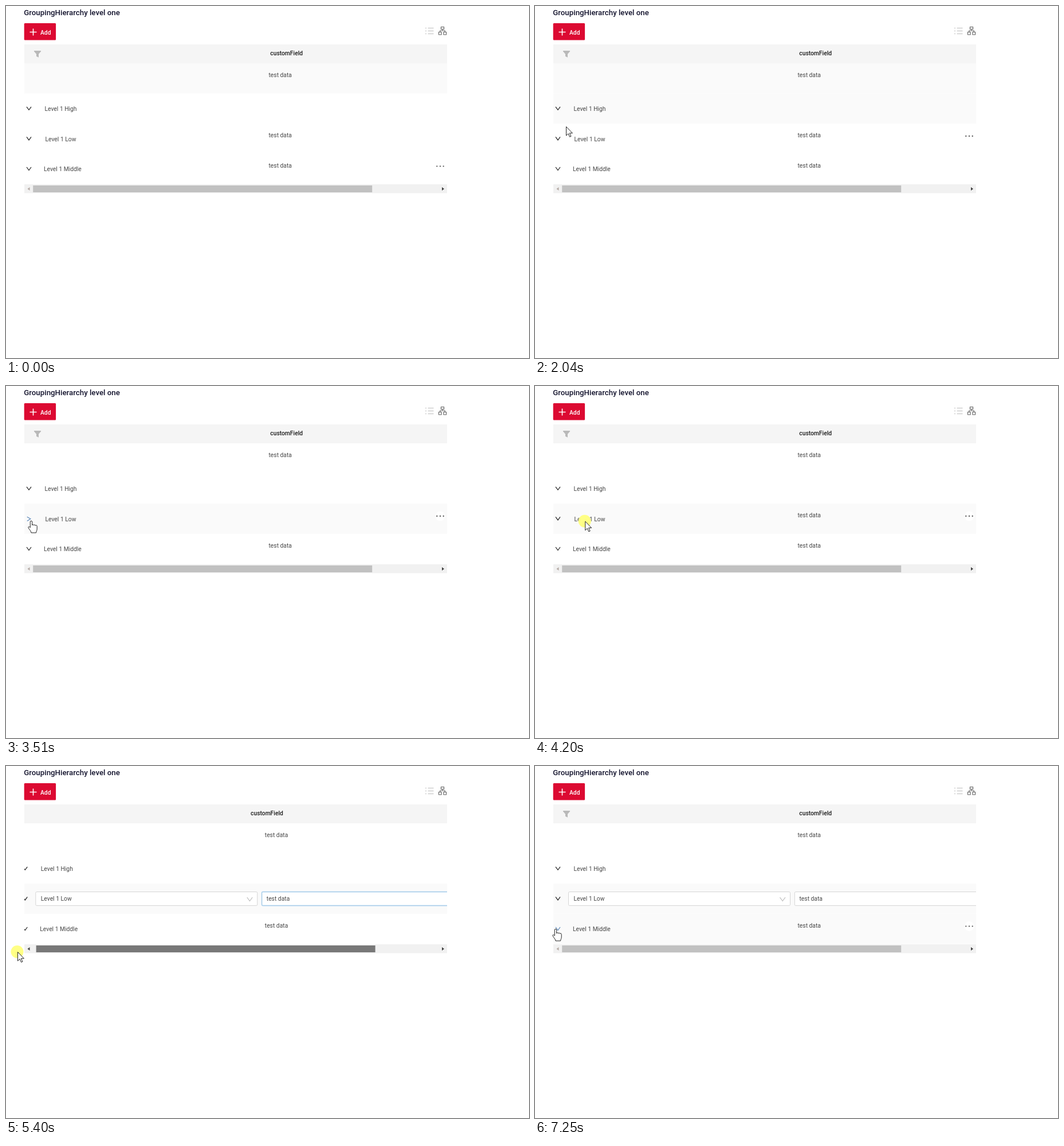
Recreate the animation shown at these times as an HTML page. Size 913 px wide and 614 px high, loop 8 s.

```html
<!DOCTYPE html>
<html lang="en">
<head>
<meta charset="utf-8">
<title>Grouping table</title>
<style>
  html, body { margin: 0; width: 100%; height: 100%; overflow: hidden; background: #fff; }
  svg { display: block; width: 100vw; height: 100vh; }
  text { font: 10.3px Roboto, sans-serif; fill: #474747; white-space: pre; }
  .title { font-size: 13.3px; font-weight: 500; fill: #14142e; }
  .head { font-weight: 500; fill: #1c1c1c; }
  .add { font-weight: 500; fill: #fff; }
  .line { fill: none; stroke-width: 1.2; }
</style>
</head>
<body>
<svg viewBox="0 0 913 614">
  <defs><clipPath id="table"><rect x="32" y="60" width="738" height="270"/></clipPath></defs>
  <text class="title" x="31.3" y="15.5">GroupingHierarchy level one</text>
  <rect x="31.7" y="30" width="55.4" height="29.4" rx="1.5" fill="#dc0a32"/>
  <path d="M41.5 45.5h12M47.5 39.5v12" stroke="#fff" stroke-width="1.6"/>
  <text class="add" x="60" y="49.5">Add</text>
  <path d="M736.5 38.5h10M736.5 43.5h10M736.5 48.5h10M732 38.5h2M732 43.5h2M732 48.5h2" stroke="#bdbdbd"/>
  <path class="line" d="M759.5 36.5h5v4h-5zM755.5 45.5h4.5v4.5h-4.5zM764 45.5h4.5v4.5h-4.5zM762 40.5v2.5M757.7 45.5v-2.5h8.6v2.5" stroke="#666"/>
  <g id="scene"></g>
</svg>
<script>
const LOOP = 8000;
const ENTER = 30;
const EDIT = 4480;
const DRAG = { start: 5150, end: 5420, release: 5650 };
const MAX_SCROLL = 95.3;
const CLICK = 200;
const ROW_HEIGHT = 52.6;

const MOVES = [
  { start: ENTER, end: 740, x: 34, y: 190 },
  { start: 860, end: 1100, x: 39, y: 181 },
  { start: 1880, end: 2040, x: 54, y: 210 },
  { start: 2340, end: 3440, x: 44, y: 235 },
  { start: 4080, end: 4280, x: 110, y: 236 },
  { start: EDIT, end: 4790, x: 147, y: 363 },
  { start: 4880, end: DRAG.start, x: 150, y: 319 },
  { start: DRAG.start, end: 5400, x: 20, y: 324 },
  { start: DRAG.release, end: 6270, x: 36, y: 284 }
];

// hover: time span of the row highlight; toggles: collapse and expand times
const ROWS = [
  { hover: [-LOOP, 2340], toggles: [] },
  { hover: [430, 2340], toggles: [1330, 1880], label: 'Level 1 High', x: 67.5 },
  { hover: [2340, LOOP], toggles: [3510, 4080], label: 'Level 1 Low', x: 68.5, editable: true },
  { hover: [6100, LOOP], toggles: [6700, 7250], label: 'Level 1 Middle', x: 66 }
].map((row, i) => ({ ...row, top: 100 + i * ROW_HEIGHT, hasData: i !== 1 }));

const DOUBLE_CLICK = [EDIT - CLICK / 2, EDIT];
const CLICKS = [...ROWS.flatMap(row => row.toggles), ...DOUBLE_CLICK];

const within = (t, [start, end]) => t >= start && t < end;
const ramp = (t, start, end) => Math.min(1, Math.max(0, (t - start) / (end - start)));
const ease = p => p * p * (3 - 2 * p);

function pointerAt(t) {
  let x = 865, y = 450;
  for (const move of MOVES) {
    const p = ease(ramp(t, move.start, move.end));
    x += (move.x - x) * p;
    y += (move.y - y) * p;
  }
  return { x, y };
}

const scrollAt = t => t < EDIT ? 0 : MAX_SCROLL * (1 - ramp(t, DRAG.start, DRAG.end));
const isDragging = t => within(t, [DRAG.start, DRAG.release]);
const isPressed = t => isDragging(t) || CLICKS.some(end => within(t, [end - CLICK, end]));
const chevronY = row => row.top + 26.5;
const onChevron = (row, { x, y }) => row.label && x < 50 && Math.abs(y - chevronY(row)) < 7;

const rect = (x, y, w, h, fill, extra = '') =>
  `<rect x="${x}" y="${y}" width="${w}" height="${h}" fill="${fill}" ${extra}/>`;
const text = (x, y, value, extra = '') => `<text x="${x}" y="${y}" ${extra}>${value}</text>`;
const path = (d, extra) => `<path d="${d}" ${extra}/>`;
const shift = (dx, content) => `<g transform="translate(${-dx} 0)">${content}</g>`;

function header(scroll) {
  return rect(32, 67, 738, 33, '#f5f5f5') + shift(scroll,
    path('M49 78h12v1.2l-4 4.6v6l-4-2v-4l-4-4.6z', 'fill="#b9b9b9"') +
    text(461.3, 85.5, 'customField', 'class="head"'));
}

function editors(t, y) {
  const focus = t < DRAG.start ? 1 : 1 - ramp(t, DRAG.start, DRAG.start + 400);
  const field = (x, w, fill, stroke) => rect(x, y - 12, w, 24, fill, `rx="2" ${stroke}`);
  const plain = 'stroke="#d5d5d5"';
  const focused = `stroke="#5cb3f7" stroke-width="1.8" stroke-opacity="${focus}"`;
  return field(58.5, 387, '#fff', plain) + text(67.5, y + 3.7, 'Level 1 Low') +
    path(`M427.5 ${y - 2.3}l4.7 6.3 4.7-6.3`, 'class="line" stroke="#bfbfbf"') +
    field(453.3, 411, '#fff', plain) + field(453.3, 411, 'none', focused) +
    text(461.5, y + 3.7, 'test data');
}

function rowContent(row, t, pointer) {
  const data = row.hasData ? text(458.5, row.top + 24, 'test data') : '';
  if (!row.label) return data;
  const y = chevronY(row);
  const closed = within(t, row.toggles);
  const arrow = closed ? `M36.8 ${y - 3.5}l6 3.6-6 3.6` : `M36 ${y - 3.3}l4 5.5 4-5.5`;
  const color = onChevron(row, pointer) ? '#5a86b8' : '#222';
  const chevron = path(arrow, `class="line" stroke="${color}"`);
  if (row.editable && t >= EDIT) return chevron + editors(t, Math.floor(y) + .5);
  return chevron + text(row.x, y + 3.8, row.label) + (closed ? '' : data);
}

function rowMenu(row, t, { x, y }) {
  const hovered = t < ENTER
    ? row === ROWS[3]
    : within(x, [32, 770]) && within(y, [row.top, row.top + ROW_HEIGHT]);
  const editing = row.editable && t >= EDIT;
  if (!hovered || !row.hasData || editing) return '';
  const cy = row.top + 21.7;
  return `<circle cx="758" cy="${cy}" r="8.5" fill="#fff"/>` +
    [-5.7, 0, 5.7].map(dx => `<circle cx="${758 + dx}" cy="${cy}" r="1.1" fill="#444"/>`).join('');
}

function scrollbar(scroll, dragging) {
  return rect(32, 311, 738, 15.5, '#f1f1f1') +
    rect(47.2 + scroll * .81, 313, 592, 12, dragging ? '#787878' : '#c1c1c1') +
    path('M41.5 316v6l-4-3z', `fill="${scroll > 0 ? '#444' : '#b5aaa5'}"`) +
    path('M761 316v6l4-3z', 'fill="#444"');
}

function cursor(t, pointer) {
  if (t < ENTER) return '';
  const shape = ROWS.some(row => onChevron(row, pointer))
    ? 'M-1.7 12V2a1.7 1.7 0 0 1 3.4 0V8c0-1.7 3-1.7 3 .2 0-1.6 2.9-1.4 2.9.6 0-1.4 2.6-1.2 2.6.6V14c0 4-1.6 4-1.6 7H0c0-3-4-6-5-9-.6-2 2-2.2 3.3 0z'
    : 'M.5 .5V16l3.6-3.3 2.5 5.6 2.3-1-2.5-5.5h5z';
  const halo = isPressed(t) ? '<circle cx="-.5" r="11" fill="#ffff85"/>' : '';
  return `<g transform="translate(${pointer.x} ${pointer.y})">${halo}` +
    path(shape, 'fill="#fff" stroke="#222" stroke-linejoin="round"') + '</g>';
}

const scene = document.getElementById('scene');

function draw(t) {
  const pointer = pointerAt(t);
  const scroll = scrollAt(t);
  // The header follows a drag slightly late
  const headerScroll = isDragging(t) ? scrollAt(t - 78) : scroll;
  const eachRow = render => ROWS.map(render).join('');
  const highlights = eachRow(({ top, hover: [on, off] }) => {
    const level = ramp(t, on, on + 300) - ramp(t, off, off + 300);
    return rect(32, top, 738, ROW_HEIGHT, '#fafafa', `fill-opacity="${level}"`);
  });
  const rows = eachRow(row => rowContent(row, t, pointer));
  const menus = eachRow(row => rowMenu(row, t, pointer));
  scene.innerHTML =
    `<g clip-path="url(#table)">${highlights}${header(headerScroll)}${shift(scroll, rows)}${menus}` +
    `${scrollbar(scroll, isDragging(t))}</g>` + cursor(t, pointer);
}

const start = performance.now();
function tick() {
  draw((performance.now() - start) % LOOP);
  requestAnimationFrame(tick);
}
tick();
</script>
</body>
</html>
```
